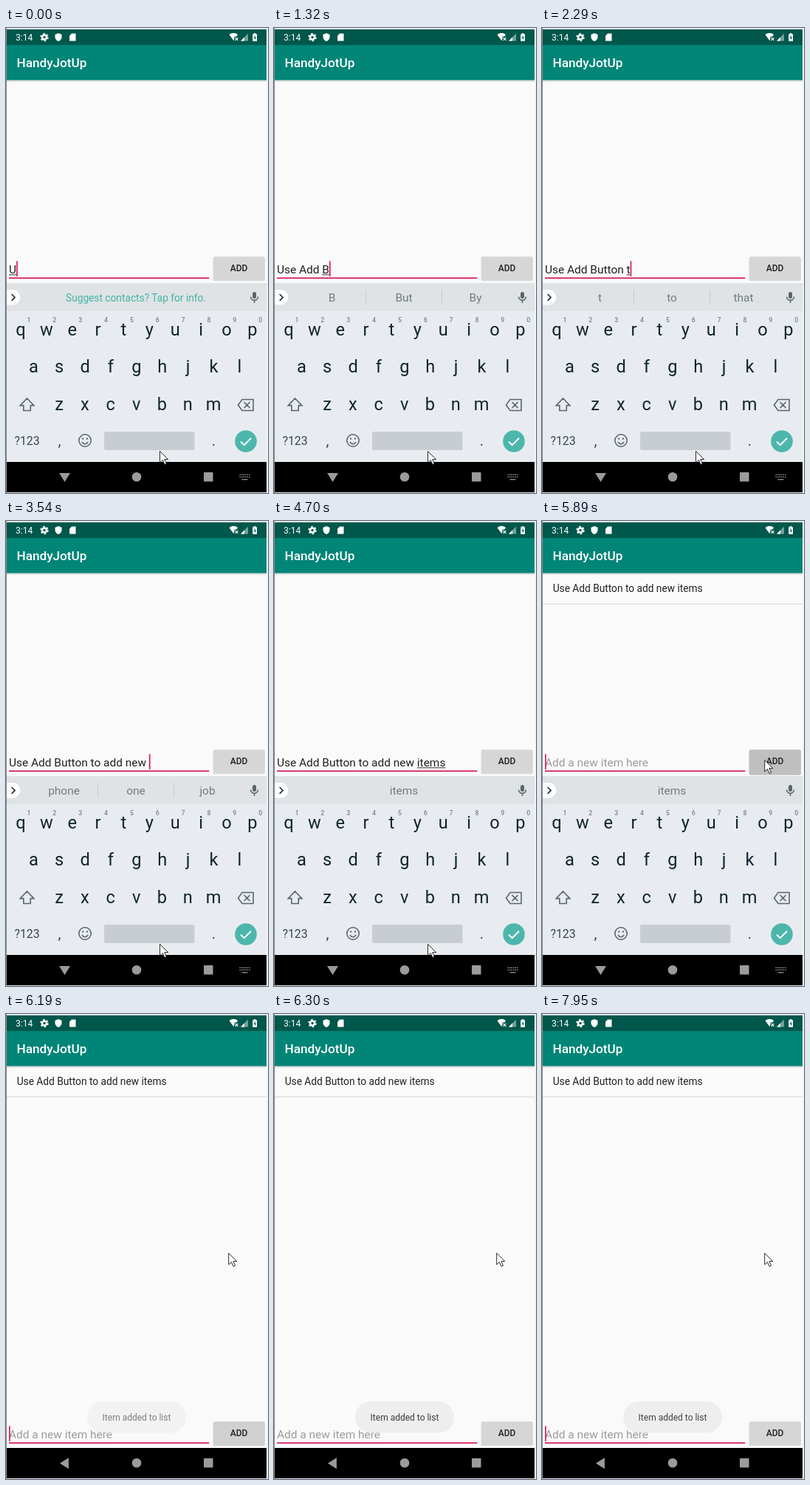
Write an HTML page that moves like this. It is 355 px wide and 629 px high and loops after 8000 ms.

```html
<!DOCTYPE html>
<html lang="en">
<head>
<meta charset="utf-8">
<title>To-do list demo</title>
<style>
  html, body { margin: 0; width: 100%; height: 100%; overflow: hidden; background: #fafafa; }
  svg { display: block; width: 100%; height: 100%; }
  text { font-family: Roboto, "Noto Sans", sans-serif; white-space: pre; }
  .mid { text-anchor: middle; }
  .bold { font-weight: 500; }
  .edit { font-size: 15.44px; }
  .icon { fill: none; stroke: #5a666c; stroke-width: 1.6; }
</style>
</head>
<body>
<svg viewBox="0 0 355 629">
  <defs>
    <linearGradient id="shade" x2="0" y2="1">
      <stop stop-color="#000" stop-opacity=".2"/>
      <stop offset="1" stop-color="#000" stop-opacity="0"/>
    </linearGradient>
  </defs>
  <rect width="355" height="629" fill="#fafafa"/>

  <!-- list -->
  <g id="item">
    <text x="14.7" y="96.3" font-size="13.73" fill="#212121">Use Add Button to add new items</text>
    <rect x="1" y="111.5" width="352" height="1.2" fill="#dcdcdc"/>
  </g>

  <!-- bars -->
  <rect y="70.5" width="355" height="3" fill="url(#shade)"/>
  <rect y="23" width="355" height="47.5" fill="#008577"/>
  <rect y="1.500" width="355" height="21.500" fill="#00574b"/>
  <text x="14.5" y="53" font-size="17.16" class="bold" fill="#fff">HandyJotUp</text>
  <text x="13" y="17" font-size="12" fill="#fff">3:14</text>
  <g fill="#fff">
    <circle cx="52" cy="12.5" r="3" fill="none" stroke="#fff" stroke-width="2.6"/>
    <circle cx="52" cy="12.5" r="4.9" fill="none" stroke="#fff" stroke-width="1.6" stroke-dasharray="2.57"/>
    <path d="M71 7l4.5 1.8v3.4q0 3.8-4.5 5.8q-4.5-2-4.5-5.8V8.8z"/>
    <path d="M89 7.5h5.5v10h-8.5v-7z"/>
    <path d="M302.5 9q5.8-4.4 11.6 0l-2 2.6h-2.6v3l-1.2 2.4z"/>
    <path d="M310.6 12.8l3.8 4m0-4l-3.8 4" stroke="#fff" stroke-width="1.2"/>
    <path d="M328 7.5v10h-10z" opacity=".45"/>
    <path d="M323 12.5v5h-5z"/>
    <path d="M335.8 7h2.6v1.2h1.6v9.6h-5.8V8.2h1.6z"/>
    <path d="M337.6 9.8l-2 3.6h1.4v2.8l2-3.7h-1.4z" fill="#00574b"/>
  </g>

  <!-- entry row -->
  <g id="row">
    <text id="entry" class="edit" x="4" y="332" fill="#212121"></text>
    <rect id="under" y="333.3" height="1" fill="#333"/>
    <rect x="4" y="337.4" width="271.3" height="1.8" fill="#d81b60"/>
    <rect id="caret" y="315.3" width="1.7" height="20.7" fill="#d81b60"/>
    <rect id="lift" x="280.5" y="310" width="70.5" rx="2"/>
    <rect id="button" x="281" y="309.2" width="69.5" height="31.6" rx="1.8"/>
    <text x="315.6" y="329.3" font-size="12" class="mid bold" fill="#212121">ADD</text>
  </g>

  <!-- keyboard -->
  <g id="board">
    <rect y="345" width="355" height="243" fill="#e8ecf0"/>
    <rect y="345" width="355" height="38" fill="#dfe3e6"/>
    <path d="M0 354h9a10.300 10.300 0 0 1 0 20.600H0z" fill="#fff"/>
    <path d="M7.6 360l4.4 4.400l-4.400 4.400" fill="none" stroke="#263238" stroke-width="1.7"/>
    <path id="bars" d="M124.5 354v20M227.5 354v20" stroke="#c4cacd"/>
    <g id="hints" class="mid" font-size="15.44" fill="#727c81"></g>
    <text id="tip" x="176" y="369.5" font-size="13.73" class="mid" fill="#45b3a5">Suggest contacts? Tap for info.</text>
    <rect x="334" y="357" width="5" height="9" rx="2.5" fill="#5a666c"/>
    <path d="M331.6 363.5a4.900 4.900 0 0 0 9.800 0M336.5 368.5v3.500" class="icon"/>
    <g id="keys" class="mid" fill="#10242c"></g>
    <path d="M28.5 501l9.3 9.600h-4.600v6.900h-9.400v-6.900h-4.600z" class="icon"/>
    <path d="M320 502.5h15v15h-15l-5.500-7.500zM322.5 506l8 8m0-8l-8 8" class="icon"/>
    <g class="icon">
      <circle cx="107" cy="558" r="8.2"/>
      <path d="M102.8 560q4.200 5.400 8.400 0"/>
      <path d="M103 555.5h2.200m3.600 0h2.200" stroke-width="2.2"/>
    </g>
    <rect x="133" y="546" width="122.5" height="25" rx="2.5" fill="#c8cdd1"/>
    <circle cx="325" cy="559" r="14.8" fill="#4db6ac"/>
    <path d="M318 559.5l4.700 4.600l9.300-9.400" fill="none" stroke="#fff" stroke-width="2"/>
  </g>

  <g id="toast">
    <rect x="110" y="524" width="134" height="42.5" rx="21" fill="#eee" opacity=".96"/>
    <text x="177" y="550.2" font-size="12" class="mid" fill="#3c3c3c">Item added to list</text>
  </g>

  <!-- navigation bar -->
  <rect y="587" width="355" height="41" fill="#000"/>
  <g fill="#9b9b9b">
    <path id="back" d="M72 602h15l-7.500 12z"/>
    <circle cx="177" cy="607.3" r="6.3"/>
    <rect x="268" y="601" width="12.5" height="12.5" rx=".8"/>
    <g id="kbd" stroke="#8c8c8c" stroke-width="1.4">
      <path d="M316.5 604.2h14M316.5 607.200h14" stroke-dasharray="1.5 1"/>
      <path d="M319.5 610.7h8"/>
    </g>
  </g>

  <!-- window edges -->
  <rect width="355" height="1.5" fill="#f4f4f4"/>
  <path d="M0 628.5h355" stroke="#dcdcdc"/>
  <rect x="353" width="2" height="629" fill="#f4f4f4"/>
  <rect width="1" height="629" fill="#858585"/>
  <path id="mouse" d="M.5.5v15.500l3.700-3.500l2.700 6l2.400-1.100l-2.600-5.800h5z" fill="#fff" stroke="#111" stroke-width=".9"/>
</svg>

<script>
const LOOP = 8000, BLINK = 490;
const TAP = 5710, ADDED = 5840, HIDE = 5960;
const $ = id => document.getElementById(id);
const clamp = v => Math.max(0, Math.min(1, v));
const ramp = (t, a, b) => clamp((t - a) / (b - a));
const ease = v => v * v * (3 - 2 * v);
const mix = (a, b, k) => a + (b - a) * k;
const set = (el, attrs) => { for (const k in attrs) el.setAttribute(k, attrs[k]); };
const show = (el, on) => set(el, { visibility: on ? 'visible' : 'hidden' });

const pen = document.createElement('canvas').getContext('2d');
const width = s => { pen.font = '15.44px Roboto, "Noto Sans", sans-serif'; return pen.measureText(s).width; };

function label(parent, str, x, y, attrs) {
  const el = document.createElementNS('http://www.w3.org/2000/svg', 'text');
  set(el, { x, y, ...attrs });
  el.textContent = str;
  parent.append(el);
  return el;
}

const keys = $('keys');
[['qwertyuiop', 20, 416], ['asdfghjkl', 37.3, 466], ['zxcvbnm', 72, 516.5]].forEach(([row, x0, y]) =>
  [...row].forEach((c, i) => label(keys, c, x0 + i * 34.87, y, { 'font-size': 23.6 })));
[...'1234567890'].forEach((c, i) =>
  label(keys, c, 31 + i * 34.85, 398, { 'font-size': 8.8, class: 'bold', fill: '#7b8488' }));
label(keys, '?123', 28.5, 563.8, { 'font-size': 15.8, fill: '#37474f' });
label(keys, ',', 72.5, 565, { 'font-size': 20, fill: '#37474f' });
label(keys, '.', 281.5, 565, { 'font-size': 20, fill: '#37474f' });
const hints = [78.5, 176, 273].map(x => label($('hints'), '', x, 370.2));

// When each key lands, how much text is typed, and the suggestions that follow
const phrase = 'Use Add Button to add new items';
const strokes = [
  [0, 1], [40, 2], [90, 3], [280, 4, 'the it a'],
  [590, 5, 'A And All'], [650, 6, 'Ad Add Address'], [760, 7, 'Add Adds Address'], [1010, 8, 'more to a'],
  [1320, 9, 'B But By'], [1390, 10, 'Bu But Buy'], [1460, 11, 'But Buy Butter'], [1560, 12, 'Butt Butter Button'],
  [1650, 13, 'Butto Button Buttons'], [1720, 14, 'Button Butt Buttons'], [1920, 15, 'and to on'],
  [2290, 16, 't to that'], [2340, 17, 'to too top'], [2510, 18, 'the do get'],
  [2760, 19, 'a add all'], [2880, 20, 'ad add address'], [3070, 21, 'add adds address'], [3120, 22, 'the a to'],
  [3310, 23, 'n new not'], [3380, 24, 'ne new need'], [3460, 25, 'new news next'], [3540, 26, 'phone one job'],
  [3850, 27, 'I in is'], [3910, 28, 'it its is'],
  [4090, 29, 'ite item iterate'], [4150, 30, 'item items itemize'], [4210, 31, 'item items itemize'], [4270, 31, 'items']
];

function caretOn(t) {
  if (t < 4270) return true;
  if (t < ADDED) return Math.floor((t - 4210) / BLINK) % 2 === 0;
  if (t < 6860) return t < 6290;
  return Math.floor((t - 6860) / BLINK) % 2 === 0;
}

function drawEntry(t) {
  const [, count, words = ''] = strokes.findLast(s => s[0] <= t);
  const added = t >= ADDED;
  const typed = added ? '' : phrase.slice(0, count);
  const start = width(typed.slice(0, typed.lastIndexOf(' ') + 1));
  const end = width(typed);

  $('entry').textContent = added ? 'Add a new item here' : typed;
  set($('entry'), { fill: added ? '#9b9b9b' : '#212121' });
  set($('under'), { x: 4 + start, width: end - start });
  set($('caret'), { x: 4 + end });
  show($('caret'), caretOn(t));

  const list = words.split(' ');
  if (list.length === 1) list.unshift('');
  hints.forEach((h, i) => { h.textContent = list[i] || ''; });
  show($('tip'), !words);
  show($('bars'), list.length === 3);
}

function drawMouse(t) {
  const k = ease(ramp(t, 4780, 5260)), drop = ease(ramp(t, 5260, 5400));
  const x = mix(208, 301.2, k), y = mix(572, 306, k) + 17 * drop;
  set($('mouse'), { transform: `translate(${x} ${y})` });
}

function draw(t) {
  drawEntry(t);
  drawMouse(t);
  show($('item'), t >= ADDED);

  const press = ramp(t, TAP, TAP + 130) * (1 - ramp(t, HIDE, 6280));
  const tone = Math.round(mix(214, 191, press));
  set($('button'), { fill: `rgb(${tone},${tone},${tone})` });
  set($('lift'), { height: 32.2 + 1.5 * press, opacity: 0.13 + 0.1 * press });

  const out = ramp(t, HIDE, HIDE + 160);
  set($('row'), { transform: `translate(0 ${t >= HIDE ? 242 : 0})` });
  set($('board'), { opacity: 1 - out, transform: `translate(0 ${24 * out * out})` });
  show($('board'), out < 1);
  set($('back'), { transform: `rotate(${90 * ease(ramp(t, HIDE, HIDE + 200))} 79.3 607.6)` });
  show($('kbd'), t < HIDE);
  set($('toast'), { opacity: ramp(t, 6010, 6290) - 0.04 * ramp(t, 7930, 7950) });
}

const begin = performance.now();
function tick() {
  draw((performance.now() - begin) % LOOP);
  requestAnimationFrame(tick);
}
tick();
</script>
</body>
</html>
```
